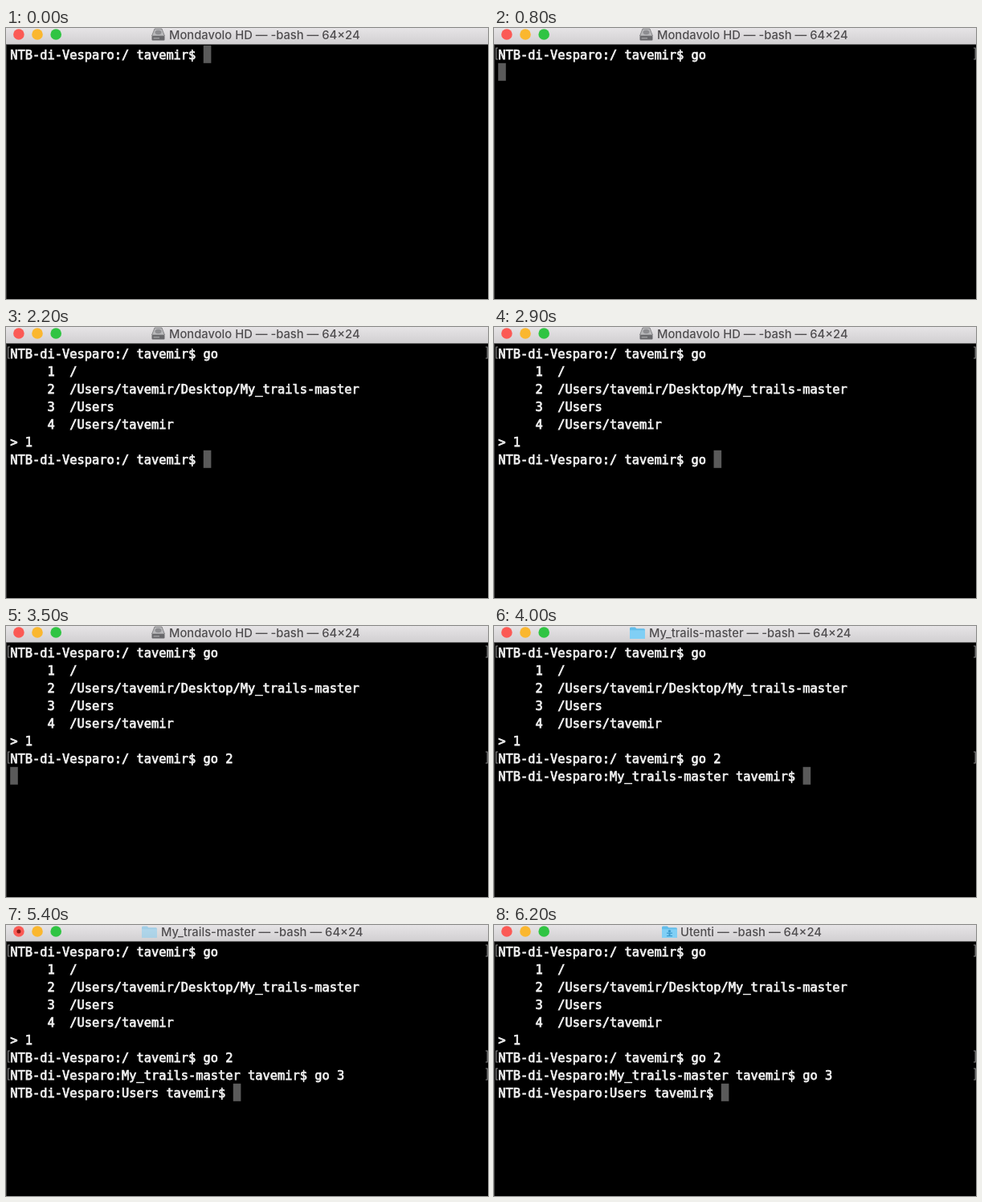
Recreate the animation shown at these times as an HTML page. Size 600 by 338 pixels, loop 6.7 s.

```html
<!DOCTYPE html>
<html lang="it">
<head>
<meta charset="utf-8">
<title>Terminal</title>
<style>
  html, body { margin: 0; width: 100%; height: 100%; overflow: hidden; background: #000; }
  svg { display: block; width: 100vw; height: 100vh; }
  text { white-space: pre; }
  #title { font: 500 14.75px Inter, sans-serif; fill: #4f4d4f; }
  #rows { font: 15.37px "DejaVu Sans Mono", monospace; fill: #f0f0f0; stroke: #f0f0f0; stroke-width: .75; }
  #marks { fill: none; stroke: #858585; stroke-width: 1.2; }
</style>
</head>
<body>
<svg viewBox="0 0 600 338">
  <defs>
    <linearGradient id="bar" x2="0" y2="1">
      <stop stop-color="#e6e4e6"/>
      <stop offset="1" stop-color="#d1cfd1"/>
    </linearGradient>
  </defs>
  <rect width="600" height="338"/>
  <path d="M.5 21V338" stroke="#3c3c3c"/>
  <rect width="600" height="20.5" fill="url(#bar)"/>
  <circle cx="15.9" cy="8" r="6.8" fill="#fb5a55"/>
  <circle cx="39" cy="8" r="6.8" fill="#fab72f"/>
  <circle cx="62.2" cy="8" r="6.8" fill="#30c443"/>
  <circle id="dot" cx="15.9" cy="8" r="2.5" fill="#8a1713"/>
  <g id="icon">
    <g id="disk">
      <path d="M4 1H13L16.5 10H.5Z" fill="#b9b9bb" stroke="#737375" stroke-width=".8"/>
      <ellipse cx="8.5" cy="5.5" rx="4" ry="2.8" fill="#8d8d90"/>
      <rect x=".5" y="10" width="16" height="5.5" rx="1" fill="#69696c"/>
      <path d="M2.5 12.8H10" stroke="#b5b5b7"/>
    </g>
    <g id="folder">
      <path d="M0 3Q0 1.5 1.5 1.5H6.5L8.5 3.3H17.5Q19 3.3 19 5V14.5Q19 16 17.5 16H1.5Q0 16 0 14.5Z" fill="#62bdea"/>
      <path d="M0 5.3H19V14.5Q19 16 17.5 16H1.5Q0 16 0 14.5Z" fill="#80cff5"/>
    </g>
    <g id="person" fill="#3c9bcf">
      <circle cx="9.5" cy="7.6" r="1.7"/>
      <path d="M6 9.6H13V10.8H10.5V13H13V14.2H6V13H8.5V10.8H6Z"/>
    </g>
  </g>
  <text id="title" y="13.8"></text>
  <rect id="cursor" width="9.6" height="22" fill="#5a5a5a"/>
  <g id="marks"></g>
  <g id="rows"></g>
</svg>
<script>
const LOOP = 6700, LEFT = 5.2, TOP = 22, PITCH = 9.253, ROW = 22;
const USER = 'tavemir', FOLDER = 'My_trails-master';
const prompt = place => `NTB-di-Vesparo:${place} ${USER}$ `;
const entry = (n, path) => `     ${n}  ${path}`;

const ROOT = prompt('/'), WORK = prompt(FOLDER), USERS = prompt('Users');

// [time, row, text]; the cursor follows the latest one
const output = [
  [0, 0, ROOT],
  [600, 0, ROOT + 'go'],
  [800, 1, ''],
  [900, 1, entry(1, '/')],
  [900, 2, entry(2, `/Users/${USER}/Desktop/${FOLDER}`)],
  [900, 3, entry(3, '/Users')],
  [900, 4, entry(4, `/Users/${USER}`)],
  [900, 5, '> '],
  [1400, 5, '> 1'],
  [1700, 6, ROOT],
  [2500, 6, ROOT + 'go'],
  [2900, 6, ROOT + 'go '],
  [3200, 6, ROOT + 'go 2'],
  [3500, 7, ''],
  [3700, 7, WORK],
  [4500, 7, WORK + 'go'],
  [4900, 7, WORK + 'go '],
  [5100, 7, WORK + 'go 3'],
  [5300, 8, ''],
  [5400, 8, USERS],
];
const marks = [[800, 0], [3500, 6], [5300, 7]];
// [time, name, text x, icon x, icon parts]
const titles = [
  [0, 'Mondavolo HD', 203, 181, ['disk']],
  [3800, FOLDER, 193, 169, ['folder']],
  [5500, 'Utenti', 232, 209, ['folder', 'person']],
];
// [start, end] of each running command
const busySpans = [[900, 2000], [3500, 3700], [5300, 6000]];

const $ = id => document.getElementById(id);
const add = (parent, tag, attrs) => {
  const el = document.createElementNS($('rows').namespaceURI, tag);
  for (const key in attrs) el.setAttribute(key, attrs[key]);
  return parent.appendChild(el);
};
const rowTop = row => TOP + row * ROW;
const clamp = v => Math.max(0, Math.min(1, v));

const rows = Array.from({ length: 9 }, (_, r) =>
  add($('rows'), 'text', { x: LEFT, y: rowTop(r) + 17 }));
const markPaths = marks.map(([, r]) => add($('marks'), 'path', {
  d: `M5 ${rowTop(r) + 3}H2.6v14H5M597 ${rowTop(r) + 3}h2.2v14H597`,
}));

function setText(el, text) {
  if (el.textContent !== text) el.textContent = text;
}

function draw(t) {
  const shown = output.filter(([time]) => time <= t);
  const screen = rows.map(() => '');
  for (const [, row, text] of shown) screen[row] = text;
  rows.forEach((el, i) => setText(el, screen[i]));

  const [, row, text] = shown.at(-1);
  $('cursor').setAttribute('x', LEFT + text.length * PITCH);
  $('cursor').setAttribute('y', rowTop(row) - .2);
  markPaths.forEach((el, i) => el.setAttribute('opacity', +(marks[i][0] <= t)));

  const [, name, textX, iconX, parts] = titles.findLast(([time]) => time <= t);
  setText($('title'), `${name} — -bash — 64×24`);
  $('title').setAttribute('x', textX);
  for (const id of ['disk', 'folder', 'person'])
    $(id).setAttribute('display', parts.includes(id) ? 'inline' : 'none');

  // A running command marks the close button and dims the title icon
  const busy = Math.max(...busySpans.map(([start, end]) =>
    clamp((t - start) / 100) * clamp((end + 200 - t) / 200)));
  $('dot').setAttribute('opacity', busy);
  $('icon').setAttribute('opacity', 1 - busy / 2);
  $('icon').setAttribute('transform', `translate(${iconX})`);
}

const begin = performance.now();
function tick() {
  draw((performance.now() - begin) % LOOP);
  requestAnimationFrame(tick);
}
tick();
</script>
</body>
</html>
```
